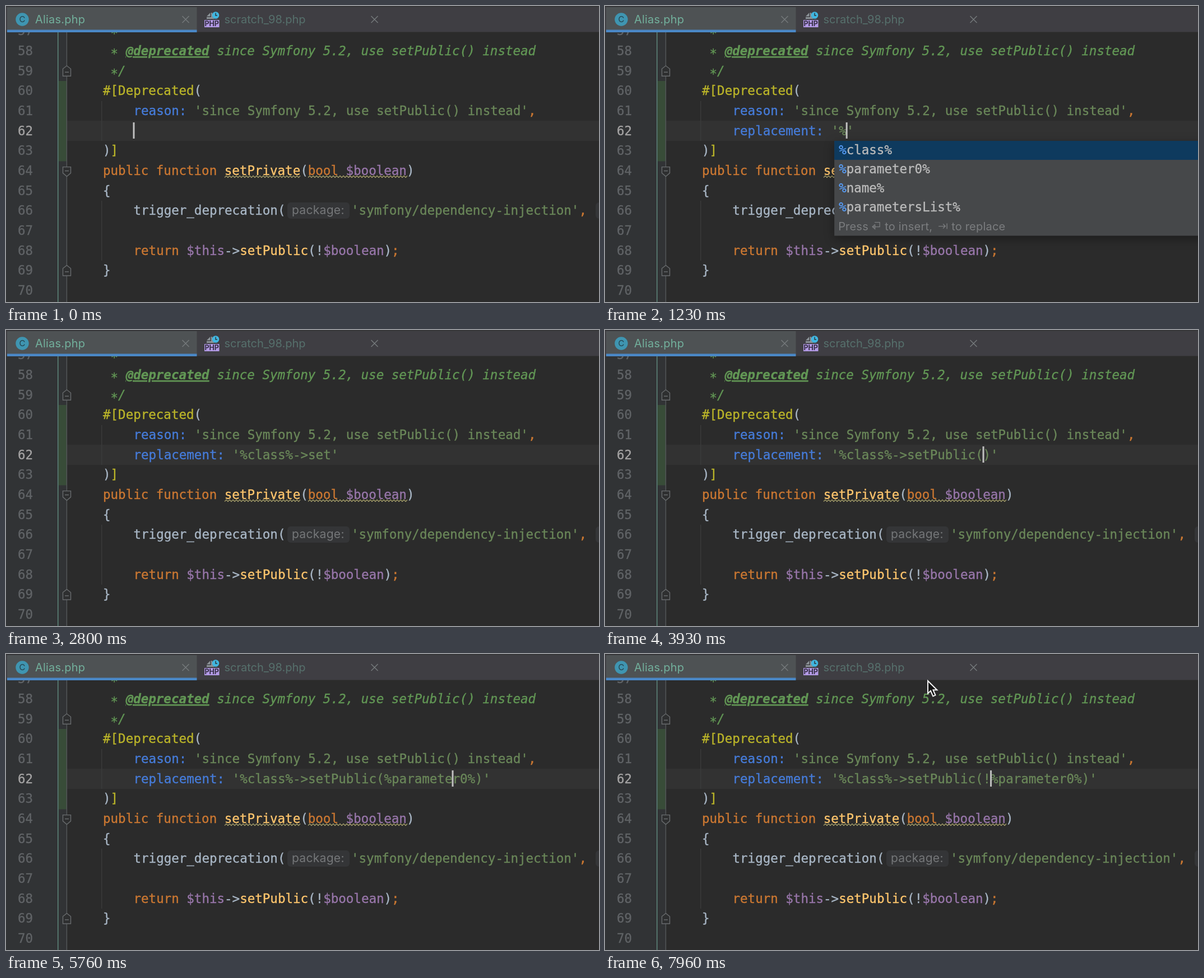
An HTML page that plays this animation: 1058x529 px, repeating every 8000 ms.

```html
<!DOCTYPE html>
<html lang="en">
<head>
<meta charset="utf-8">
<title>Code editor</title>
<style>
  html, body { margin: 0; width: 100%; height: 100%; overflow: hidden; background: #2b2b2b; }
  svg { display: block; width: 100vw; height: 100vh; }
  text { white-space: pre; font: 22.5px "DejaVu Sans Mono", monospace; }
  .ui { font: 20px Inter, sans-serif; }
  .doc { font-style: italic; }
  .tag { font-weight: bold; text-decoration: underline 2px; text-underline-offset: 2px; }
  .popup { filter: drop-shadow(0 5px 9px rgba(0, 0, 0, .35)); }
</style>
</head>
<body>
<svg id="stage" viewBox="0 0 1058 529" preserveAspectRatio="none"></svg>
<script>
const NS = 'http://www.w3.org/2000/svg';
const stage = document.getElementById('stage');
const LOOP = 8000, PITCH = 13.546, ROW = 35.67, LEFT = 173, INDENT = 227.5;
const C = {
  text: '#a9b7c6', string: '#6a8759', name: '#467cda', key: '#cc7832', func: '#ffc66d',
  variable: '#9876aa', attr: '#bbb529', doc: '#629755', number: '#606366'
};

const rowTop = n => 205.3 + (n - 62) * ROW;
const baseline = n => rowTop(n) + 25.4;

function el(parent, tag, attrs = {}, content) {
  const node = document.createElementNS(NS, tag);
  for (const key in attrs) node.setAttribute(key, attrs[key]);
  if (content !== undefined) node.textContent = content;
  return parent.appendChild(node);
}
const rect = (p, x, y, width, height, fill, more) => el(p, 'rect', { x, y, width, height, fill, ...more });
const stroke = (p, d, color, width = 1.5, fill = 'none') =>
  el(p, 'path', { d, stroke: color, 'stroke-width': width, fill });
const label = (p, x, y, fill, content, more) => el(p, 'text', { x, y, fill, class: 'ui', ...more }, content);

// Runs are [color, text, class]; the thin stroke gives the medium weight.
function code(parent, x, y, runs) {
  const line = el(parent, 'text', { x, y });
  for (const [fill, content, cls = ''] of runs)
    el(line, 'tspan', { fill, stroke: fill, 'stroke-width': .35, class: cls }, content);
}

function wave(x1, x2, y) {
  let d = `M${x1} ${y}`;
  for (let x = x1, up = true; x + 3 <= x2; x += 3, up = !up) d += `l3 ${up ? -3 : 3}`;
  stroke(stage, d, '#a39c68', 1.3);
}

function foldMark(n, end) {
  const y = rowTop(n) + 19;
  const d = end ? `M101.5 ${y - 5}l7 -5.5l7 5.5v13h-14z` : `M101.5 ${y - 8}h14v11l-7 6l-7 -6z`;
  stroke(stage, d, '#686b6d', 1.4, '#2e2f30');
  stroke(stage, `M105 ${y + (end ? 1 : -1)}h7`, '#686b6d');
}

function hint(x, width, content) {
  rect(stage, x, 351, width, 29, '#343537', { rx: 6 });
  label(stage, x + 8, 372, '#757779', content, { style: 'font-size:21px;letter-spacing:.3px' });
}

function buildEditor() {
  rect(stage, 0, 0, 1058, 529, '#2b2b2b');
  rect(stage, 0, 0, 108, 529, '#313335');
  rect(stage, 109, 205, 949, 36, '#323232');
  rect(stage, 94, 134, 14, 143.5, '#384c38');
  rect(stage, 92, 47, 1.5, 482, '#5f877d');
  rect(stage, 107.7, 47, 1.4, 482, '#555859');
  rect(stage, 170, 170, 1.4, 71, '#3a3b3b');
  rect(stage, 170, 348, 1.4, 107, '#3a3b3b');
  foldMark(59, true);
  foldMark(64, false);
  foldMark(69, true);
  for (let n = 57; n <= 70; n++)
    code(stage, 21, baseline(n), [[n === 62 ? '#a4a3a3' : C.number, String(n)]]);

  const put = (n, x, ...runs) => code(stage, x, baseline(n), runs);
  // Asterisks sit at mid height.
  for (const n of [57, 58, 59]) code(stage, LEFT + PITCH, baseline(n) + 5, [[C.doc, '*', 'doc']]);
  put(58, LEFT + 3 * PITCH, [C.doc, '@deprecated', 'doc tag'],
    [C.doc, ' since Symfony 5.2, use setPublic() instead', 'doc']);
  put(59, LEFT + 2 * PITCH, [C.doc, '/', 'doc']);
  put(60, LEFT, [C.attr, '#[Deprecated'], [C.text, '(']);
  put(61, INDENT, [C.name, 'reason: '],
    [C.string, "'since Symfony 5.2, use setPublic() instead'"], [C.key, ',']);
  put(63, LEFT, [C.text, ')'], [C.attr, ']']);
  put(64, LEFT, [C.key, 'public function '], [C.func, 'setPrivate'], [C.text, '('],
    [C.key, 'bool '], [C.variable, '$boolean'], [C.text, ')']);
  wave(390, 526, 306.5);
  wave(539, 717, 306.5);
  put(65, LEFT, [C.text, '{']);
  put(66, INDENT, [C.text, 'trigger_deprecation(']);
  hint(502, 111, 'package:');
  put(66, 616, [C.string, "'symfony/dependency-injection'"], [C.key, ',']);
  rect(stage, 1052, 351, 20, 29, '#343537', { rx: 6 });
  put(68, INDENT, [C.key, 'return '], [C.variable, '$this'], [C.text, '->'], [C.func, 'setPublic'],
    [C.text, '(!'], [C.variable, '$boolean'], [C.text, ')'], [C.key, ';']);
  put(69, LEFT, [C.text, '}']);
}

function buildTabs() {
  rect(stage, 0, 0, 1058, 46.5, '#3f3e43');
  rect(stage, 0, 0, 1058, 1.5, '#323234');
  rect(stage, 2, 2, 338.5, 41, '#4e5254');
  rect(stage, 2, 42.5, 338.5, 4.5, '#4a88c7');
  el(stage, 'circle', { cx: 29, cy: 24, r: 11.7, fill: '#3f95b1' });
  label(stage, 29, 29.3, '#24404b', 'C', { 'text-anchor': 'middle', style: 'font-size:15px' });
  label(stage, 52, 31, '#72b09c', 'Alias.php', { style: 'letter-spacing:.2px' });
  label(stage, 389.5, 31, '#56706c', 'scratch_98.php');
  for (const x of [320.5, 657.5]) stroke(stage, `M${x - 6} 18l12 12m0 -12l-12 12`, '#75797b', 1.5);

  el(stage, 'path', { d: 'M358 18.5l6.5 -6.5v6.5zM366 12h2v7l4 4h-14v-3h8z', fill: '#8d9499' });
  el(stage, 'circle', { cx: 374, cy: 16.5, r: 6.3, fill: '#40b6e0' });
  stroke(stage, 'M374 12.5v4.5h3', '#31383c', 1.5);
  rect(stage, 354, 25, 26.5, 13, '#b39ae6');
  label(stage, 367.2, 36.2, '#332d42', 'PHP', { 'text-anchor': 'middle', style: 'font-size:12.5px;font-weight:700' });
}

// Steps: [time, line with "|" for the caret, popup].
const VARS = ['%class%', '%parameter0%', '%name%', '%parametersList%'];
const popup = (col, match = 0, selected = 0, items = VARS) => ({ col, match, selected, items });
const steps = [
  [0, '|'], [100, 'r|'], [160, 're|'],
  [220, 'rep|', popup(0, 3, 0, ['replacement:', 'str_replace'])],
  [400, 'replacement: |']
];
const value = (time, content, list) => steps.push([time, `replacement: '${content}'`, list]);
function type(start, gap, before, typed) {
  [...typed].forEach((_, i) => value(start + i * gap, before + typed.slice(0, i + 1) + '|'));
}

value(800, '|');
value(960, '');
value(1100, '%|');
value(1140, '%|', popup(14, 1));
value(1400, '%class%|');
value(1660, '%class%');
type(1800, 230, '%class%', '->');
value(2060, '%class%->|', popup(23));
value(2230, '%class%->s|', popup(23, 0, 0, [VARS[0], VARS[3]]));
type(2360, 130, '%class%->s', 'et');
value(2800, '%class%->set');
type(2830, 57, '%class%->set', 'Publi');
const call = '%class%->setPublic';
value(3300, call + '|');
value(3460, call + '(|');
value(3700, call + '()|');
value(3930, call + '(|)');
value(4260, call + '(%|)');
value(4660, call + '(%)');
value(4800, call + '(%|)');
value(4960, call + '(%)');
value(5100, call + '(%)', popup(33, 1));
value(5230, call + '(%|)', popup(33, 1, 1));
const arg = VARS[1];
for (let i = 0; i <= arg.length; i++) {
  const at = arg.length - i;
  value(i ? 5620 + i * 40 : 5360, `${call}(${arg.slice(0, at)}|${arg.slice(at)})`);
}
[6230, 6430, 6530, 6630, 6750, 6860, 7000].forEach((time, i) =>
  value(time, `${call}(!${i % 2 || time === 6860 ? '' : '|'}${arg})`));

function drawPopup({ col, match, selected, items }) {
  const x = INDENT + col * PITCH - 8, top = 241, rowHeight = 33.9;
  const bottom = top + items.length * rowHeight;
  const box = el(live, 'g', { class: 'popup' });
  rect(box, x, top, 1100 - x, items.length * rowHeight + 34, '#46484a');
  rect(box, x, top + selected * rowHeight, 1100 - x, rowHeight, '#0e3a5e');
  items.forEach((item, i) => {
    const from = match ? item.indexOf(item.startsWith('%') ? '%' : 'rep') : 0;
    code(box, x + 8, top + i * rowHeight + 24, [
      ['#bbbbbb', item.slice(0, from)],
      ['#589df6', item.slice(from, from + match)],
      ['#bbbbbb', item.slice(from + match)]
    ]);
  });
  const y = bottom + 24, spaced = { style: 'letter-spacing:.2px' };
  label(box, x + 7, y, '#7b7d7f', 'Press', spaced);
  stroke(box, `M${x + 72} ${y - 14}h9v8h-13m4.5 -4l-4.5 4l4.5 4v-8`, '#7b7d7f', 1.3);
  label(box, x + 90, y, '#7b7d7f', 'to insert,', spaced);
  stroke(box, `M${x + 186} ${y - 7}h12m-4 -4l4 4l-4 4m7 -9v10`, '#7b7d7f', 1.4);
  label(box, x + 209, y, '#7b7d7f', 'to replace', spaced);
}

function drawLine([, source, list], resolved) {
  live.replaceChildren();
  const caret = source.indexOf('|');
  const line = source.replace('|', '');
  const quote = line.indexOf("'");
  const cut = quote < 0 ? line.length : quote;
  code(live, INDENT, baseline(62), [
    [resolved ? C.name : C.text, line.slice(0, cut)],
    [C.string, line.slice(cut)]
  ]);
  if (caret >= 0) rect(live, INDENT - 1 + caret * PITCH, 208, 3, 29, '#c0c0c0');
  if (list) drawPopup(list);
}

// Pointer path: [time, x, y].
const path = [[7000, 1052, 405], [7400, 905, 290], [7800, 685, 126], [7960, 575, 47]];
function movePointer(time) {
  const t = Math.floor(time / 40) * 40;
  pointer.style.display = t < 7000 ? 'none' : '';
  if (t < 7000) return;
  const i = Math.max(1, path.findIndex(p => p[0] >= t));
  const [a, b] = [path[i - 1], path[i]];
  const k = (t - a[0]) / (b[0] - a[0]);
  pointer.setAttribute('transform', `translate(${a[1] + (b[1] - a[1]) * k} ${a[2] + (b[2] - a[2]) * k})`);
}

buildEditor();
const live = el(stage, 'g');
buildTabs();
const pointer = stroke(stage, 'M1 1V23.5L6 18.8L10.2 28.5L14.5 26.6L10.4 17.2H17.3z', '#f2f2f2', 2, '#111');

let shown = '', origin;
function frame(now) {
  origin ??= now;
  const time = (now - origin) % LOOP;
  let index = steps.length - 1;
  while (steps[index][0] > time) index--;
  const resolved = time >= 640;
  const state = index + ':' + resolved;
  if (state !== shown) drawLine(steps[index], resolved);
  shown = state;
  movePointer(time);
  requestAnimationFrame(frame);
}
drawLine(steps[0], false);
movePointer(0);
requestAnimationFrame(frame);
</script>
</body>
</html>
```
